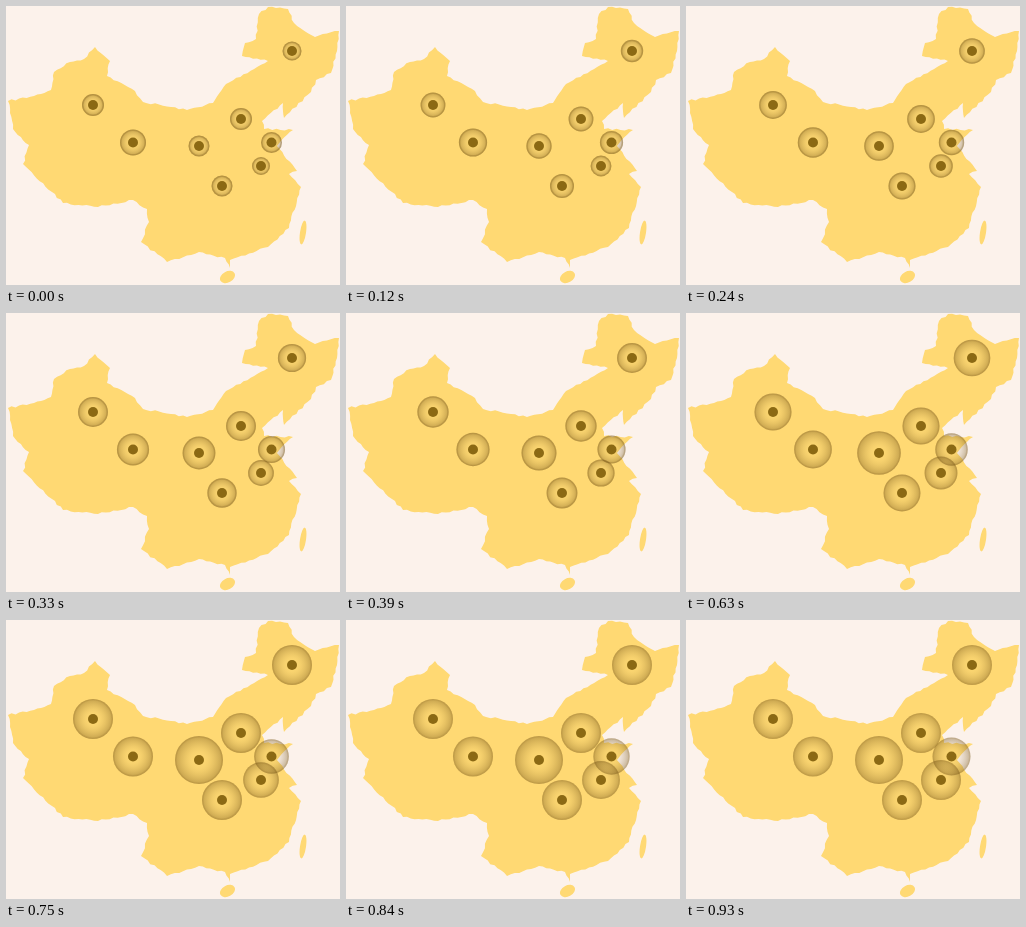
These frames come from a looping animation (334 by 279 pixels, 1360 ms). An HTML page with a canvas:

```html
<!DOCTYPE html>
<html lang="en">
<head>
<meta charset="utf-8">
<title>Map with pulsing markers</title>
<style>
html, body { margin: 0; width: 100%; height: 100%; overflow: hidden; background: #fcf2eb; }
canvas { display: block; }
</style>
</head>
<body>
<canvas id="stage"></canvas>
<script>
const W = 334, H = 279, LOOP = 1360, STEP = 30, LAST = 930;
const TAU = Math.PI * 2;
const canvas = document.getElementById('stage');
const ctx = canvas.getContext('2d');
const dpr = window.devicePixelRatio || 1;
canvas.width = W * dpr;
canvas.height = H * dpr;
canvas.style.width = W + 'px';
canvas.style.height = H + 'px';
ctx.scale(dpr, dpr);

const mainland = [
  2,95, 28,90, 45,84, 48,66, 64,56, 78,53, 89,41, 104,55, 101,70, 129,85,
  137,96, 181,104, 207,97, 220,78, 262,55, 236,50, 239,37, 250,33, 253,8, 262,1,
  282,3, 288,17, 309,31, 333,25, 331,45, 325,67, 310,74, 305,86, 278,112, 277,97,
  256,115, 258,123, 287,124, 271,140, 291,165, 283,168, 295,181, 283,222, 262,241, 224,254,
  224,262, 219,252, 193,246, 161,256, 135,236, 143,216, 141,203, 127,194, 92,201, 57,197,
  17,158, 23,139, 7,123
];

// x, y, first radius, then full radius and growth time where they differ
const markers = [
  [286, 45, 9.5],
  [87, 99, 11],
  [127, 136.5, 13],
  [193, 140, 10.5, 24],
  [235, 113, 11],
  [265.5, 136.5, 10.5, 19, LAST],
  [255, 160, 9, 20, LAST],
  [216, 180, 10.5]
];

let seed = 7;
function random() {
  seed = (seed * 16807) % 2147483647;
  return seed / 2147483647;
}

// Closed outline whose edges are broken into small, uneven steps.
function coastline(pts, rough) {
  const path = new Path2D();
  for (let i = 0; i < pts.length; i += 2) {
    const x = pts[i], y = pts[i + 1];
    const dx = pts[(i + 2) % pts.length] - x;
    const dy = pts[(i + 3) % pts.length] - y;
    const len = Math.hypot(dx, dy), n = Math.max(1, Math.round(len / 4));
    path.lineTo(x, y);
    for (let k = 1; k < n; k++) {
      const off = (random() - 0.5) * 2 * rough / len;
      path.lineTo(x + dx * k / n - dy * off, y + dy * k / n + dx * off);
    }
  }
  path.closePath();
  return path;
}

const land = coastline(mainland, 1);
land.ellipse(297, 226.5, 3, 12, 0.15, 0, TAU);
land.closePath();
land.ellipse(221.5, 271, 8, 5.5, -0.5, 0, TAU);

const shade = a => `rgba(118, 86, 24, ${a})`;

function disc(x, y, r, fill) {
  ctx.beginPath();
  ctx.arc(x, y, r, 0, TAU);
  ctx.fillStyle = fill;
  ctx.fill();
}

function drawMarker([x, y, from, to = 20, span = 750], t) {
  const r = from + (to - from) * Math.min(1, t / span);
  const glow = ctx.createRadialGradient(x, y, 0, x, y, r);
  for (let s = 0; s <= 1; s += 0.125) {
    glow.addColorStop(s, shade(0.43 * s ** 2));
  }
  disc(x, y, r, glow);
  ctx.strokeStyle = shade(0.25 * (1 - 0.7 * t / LAST));
  ctx.lineWidth = 1.5;
  ctx.beginPath();
  ctx.arc(x, y, r - 0.75, 0, TAU);
  ctx.stroke();
  disc(x, y, 5, '#8b6914');
}

function draw(now) {
  const t = Math.min(LAST, Math.floor((now % LOOP) / STEP) * STEP);
  ctx.fillStyle = '#fcf2eb';
  ctx.fillRect(0, 0, W, H);
  ctx.fillStyle = '#ffd973';
  ctx.fill(land);
  markers.forEach(m => drawMarker(m, t));
}

const start = performance.now();
function tick() {
  draw(performance.now() - start);
  requestAnimationFrame(tick);
}
tick();
</script>
</body>
</html>
```
